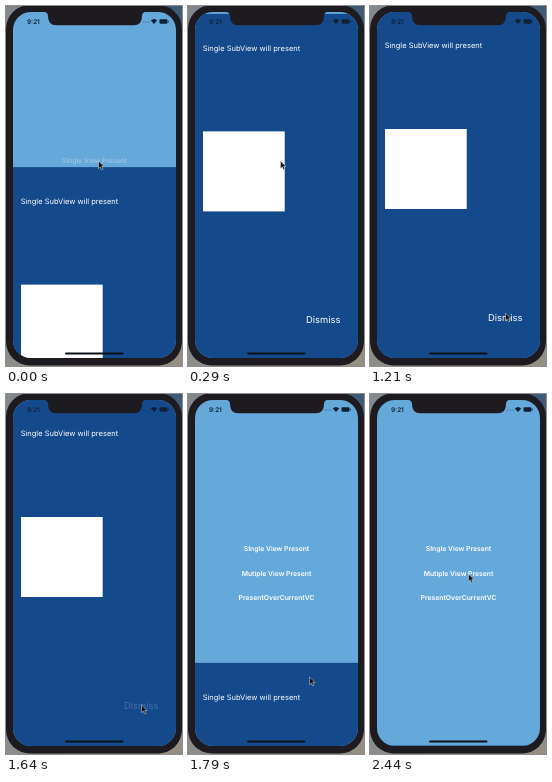
An HTML page for the animation above (2.49 s loop, 176 by 360 pixels).

```html
<!DOCTYPE html>
<html lang="en">
<head>
<meta charset="utf-8">
<title>Sheet presentation</title>
<style>
  html, body { margin: 0; width: 100%; height: 100%; overflow: hidden; }
  body { background: linear-gradient(100deg, #858a8e, transparent 60%), linear-gradient(#3f5a75, #948f82 80%); }
  /* slight softness of scaled-down footage */
  svg { display: block; width: 176px; height: 360px; filter: blur(.35px); }
  text { font-family: Inter, "Liberation Sans", sans-serif; fill: #fff; text-rendering: geometricPrecision; }
  .menu { font-size: 6.8px; font-weight: 600; text-anchor: middle; }
  .status, .status text { fill: #0f2135; }
</style>
</head>
<body>
<svg viewBox="0 0 176 360">
  <defs>
    <clipPath id="screen"><rect x="7" y="6" width="163" height="346" rx="18"/></clipPath>
  </defs>

  <rect x="0" y="-1" width="176" height="360.5" rx="24" fill="#1d1b20"/>

  <g clip-path="url(#screen)">
    <rect x="7" y="6" width="163" height="346" fill="#65a8da"/>
    <g class="menu">
      <text id="single" x="88.5" y="156.7">SIngle View Present</text>
      <text x="88.5" y="181.5">Mutiple View Present</text>
      <text x="88.5" y="206">PresentOverCurrentVC</text>
    </g>

    <g id="sheet">
      <rect x="7" y="5.5" width="163" height="347" fill="#144a8b"/>
      <text x="14.7" y="42.3" font-size="7.5">Single SubView will present</text>
      <rect x="15" y="123" width="81.7" height="80" fill="#fff"/>
      <text id="dismiss" x="118" y="314.8" font-size="9.4">Dismiss</text>
    </g>

    <g class="status">
      <text x="21" y="18" font-size="6.4" font-weight="600">9:21</text>
      <g opacity=".5">
        <circle cx="137" cy="16" r=".6"/><circle cx="139" cy="16" r=".6"/>
        <circle cx="141" cy="16" r=".6"/><circle cx="143" cy="16" r=".6"/>
      </g>
      <path d="M144.8 14.6Q148 11.6 151.2 14.6L148 18Z"/>
      <rect x="153.5" y="13.2" width="8" height="4.6" rx="1.2"/>
      <rect x="162" y="14.7" width=".8" height="1.6"/>
    </g>
    <rect x="59" y="346.4" width="58.5" height="2.2" rx="1.1" fill="#0b1118"/>
  </g>

  <path d="M37.5 5.8H140Q136 6.2 136 10.2Q136 19.3 127.5 19.3H50.5Q42 19.3 42 10.2Q42 6.2 37.5 5.8Z" fill="#1d1b20"/>

  <path id="cursor" d="M-.5 0V7.6L1.3 6L2.5 8.8L3.9 8.2L2.7 5.5H5.1Z" fill="#111" stroke="#dfe6ee" stroke-width=".5"/>
</svg>

<script>
  const LOOP = 2490, FRAME = 1000 / 14, TRAVEL = 346;
  const PRESENT = -101, PRESS = 1495, DISMISS = 1643;

  // time, x, y
  const pointer = [
    [0, 93, 155], [400, 93, 155], [710, 129, 269], [1000, 137, 303],
    [1210, 136, 307], [1360, 136, 311], [1643, 136, 311],
    [1786, 122, 283], [2080, 104, 206], [2430, 99, 180]
  ];
  const el = id => document.getElementById(id);
  const single = el("single"), sheet = el("sheet"), dismiss = el("dismiss"), cursor = el("cursor");

  const move = (node, x, y) => node.setAttribute("transform", `translate(${x.toFixed(2)} ${y.toFixed(2)})`);

  // Share of the way left for a critically damped spring
  function spring(ms, rate) {
    const x = Math.max(0, ms) / 1000 * rate;
    return (1 + x) * Math.exp(-x);
  }

  function pointerAt(t) {
    const i = pointer.findIndex(p => p[0] > t);
    if (i < 0) return pointer[pointer.length - 1].slice(1);
    const [t0, x0, y0] = pointer[i - 1], [t1, x1, y1] = pointer[i];
    const k = (t - t0) / (t1 - t0);
    return [x0 + (x1 - x0) * k, y0 + (y1 - y0) * k];
  }

  function draw(now) {
    const t = Math.floor((now % LOOP + 5) / FRAME) * FRAME;
    const left = t < DISMISS ? spring(t - PRESENT, 18.26) : 1 - spring(t - DISMISS, 19.3);
    move(sheet, 0, left * TRAVEL);
    move(cursor, ...pointerAt(t));
    single.setAttribute("opacity", t < 300 ? 0.32 : 1);
    dismiss.setAttribute("opacity", t < PRESS ? 1 : 0.2);
  }

  const start = performance.now();
  function tick() {
    draw(performance.now() - start);
    requestAnimationFrame(tick);
  }
  tick();
</script>
</body>
</html>
```
